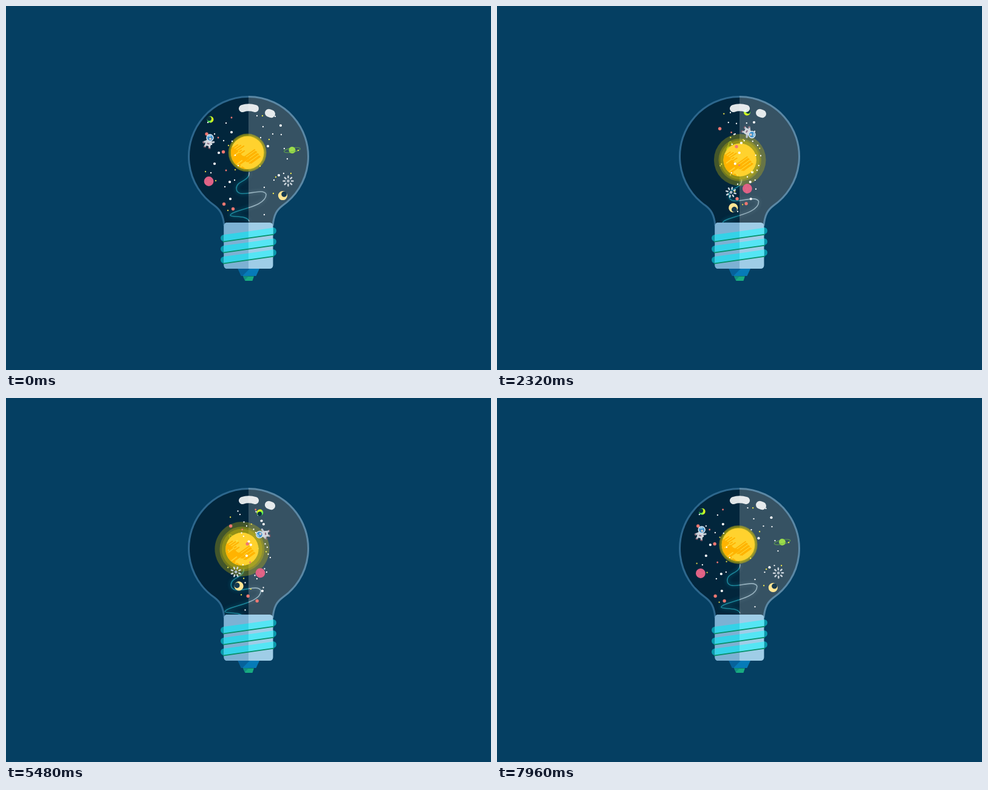
An HTML page for the animation above (8000 ms loop, 800x600 px).

```html
<!DOCTYPE html>
<html lang="en">
<head>
<meta charset="utf-8">
<title>Space in a bulb</title>
<style>
  html, body { margin: 0; width: 100%; height: 100%; overflow: hidden; background: #053f62; }
  svg { display: block; width: 800px; height: 600px; }
</style>
</head>
<body>
<svg viewBox="0 0 800 600">
  <defs>
    <path id="glass" d="M360 362C358 343 353 336 344 329A98.5 98.5 0 1 1 456 329C447 336 442 343 440 362"/>
    <path id="wire" d="M401 274C402 290 380 287 380 301C381 321 423 297 429 310C431 332 371 336 370 345C372 349 398 344 401 355"/>
    <clipPath id="left"><rect x="290" y="130" width="110" height="340"/></clipPath>
    <clipPath id="right"><rect x="400" y="130" width="110" height="340"/></clipPath>
    <clipPath id="inside"><use href="#glass"/></clipPath>
    <clipPath id="disc"><circle r="27.2"/></clipPath>
    <linearGradient id="lime"><stop offset=".3" stop-color="#55ee55"/><stop offset=".8" stop-color="#d8f51c"/></linearGradient>
    <filter id="blur" x="-50%" y="-50%" width="200%" height="200%"><feGaussianBlur stdDeviation="3"/></filter>
  </defs>

  <g clip-path="url(#left)"><use href="#glass" fill="#02263c" stroke="#2d678d" stroke-width="3"/></g>
  <g clip-path="url(#right)"><use href="#glass" fill="#365263" stroke="#5b88a5" stroke-width="3"/></g>

  <g clip-path="url(#inside)" fill="none">
    <g clip-path="url(#left)"><g class="sway">
      <use href="#wire" stroke="#18a0b8" stroke-width="3" opacity=".35" filter="url(#blur)"/>
      <use href="#wire" stroke="#1b8498" stroke-width="1.6"/>
    </g></g>
    <g clip-path="url(#right)"><g class="sway">
      <use href="#wire" stroke="#9fc0cc" stroke-width="3" opacity=".25" filter="url(#blur)"/>
      <use href="#wire" stroke="#97b2bf" stroke-width="1.6"/>
    </g></g>
  </g>

  <g id="saturn">
    <ellipse rx="13.5" ry="3.6" fill="none" stroke="#5c9a50" stroke-width="1.2"/>
    <circle r="5.5" fill="#9bdc4b"/>
    <path d="M-5 1.5Q0 4.5 5 1.5" fill="none" stroke="#77bb46"/>
  </g>

  <g id="sun">
    <g id="glow" fill="#e3cb00" fill-opacity=".29"></g>
    <circle r="27.2" fill="#ffd22e"/>
    <g clip-path="url(#disc)">
      <path d="M-30-12L-18-5L-8 5L4 9L-12 20L2 30H-30Z" fill="#ffb300"/>
      <g id="hatch" stroke="#ffb300" stroke-width="2" stroke-linecap="round"></g>
      <path d="M-17 19l8-6M-11 23l7-5M-22 5l8-6" stroke="#ffd22e" stroke-width="2" stroke-linecap="round"/>
    </g>
  </g>

  <g id="stars"></g>

  <g id="limeMoon"><circle r="5.4" fill="url(#lime)"/><circle cx="-1.8" cy="-1.2" r="3.6" fill="#0a3340"/></g>
  <g id="pinkPlanet">
    <circle r="7.9" fill="#df6186"/>
    <path d="M-5-3h6M-2 0h8M-6 3h7" stroke="#e56f86" stroke-width="1"/>
  </g>
  <g id="burst"></g>
  <g id="creamMoon"><circle r="7.6" fill="#ffe593"/><circle cx="2.3" cy="-2.3" r="4.5" fill="#163a50"/></g>
  <g id="astronaut">
    <path d="M-4 2L-8 5M4 2L8 0M-3 8L-4 11M3 8L4 11" stroke="#bfc5cf" stroke-width="3.2" stroke-linecap="round"/>
    <path d="M-6 12h4M2 12h4M-9 4l2 3" stroke="#805563" stroke-width="1.6"/>
    <rect x="-5" y="-1" width="10" height="10" rx="3" fill="#d3d6dc"/>
    <path d="M-2 5h4" stroke="#8b6c86" stroke-width="2"/>
    <circle cy="-5" r="6.2" fill="#d4e3ef"/>
    <circle cy="-5" r="4.6" fill="#3b8fcb"/>
    <path d="M-3-6A3.4 3.4 0 0 1 1-8" fill="none" stroke="#c7e9fa" stroke-width="1.3"/>
    <circle cx="1" cy="-3.5" r="2" fill="#d7c4bd"/>
  </g>

  <g fill="none" stroke="#fff" stroke-opacity=".88" stroke-linecap="round">
    <path d="M390 169Q400 165.500 411 169" stroke-width="12"/>
    <path d="M433.500 176.200L437.500 177.800" stroke-width="13"/>
  </g>

  <g id="knobs" stroke-width="11" stroke-linecap="round"></g>
  <rect x="359.500" y="357" width="81" height="76" rx="5.500" fill="#9fcde7"/>
  <path d="M400 357V433H365Q359.500 433 359.500 427.500V362.500Q359.500 357 365 357Z" fill="#7db1d3"/>
  <g id="threads"></g>
  <path d="M382.500 433H418L412.500 445H388Z" fill="#067bb8"/>
  <path d="M382.500 433H402L390 445H388Z" fill="#06629b"/>
  <path d="M391 445.500H409L406.500 453H394.500Z" fill="#18ab80"/>
  <path d="M391 445.500H400L394 452Z" fill="#109080"/>
</svg>

<script>
const LOOP = 8000;
const $ = id => document.getElementById(id);

function add(parent, tag, attrs) {
  const node = document.createElementNS('http://www.w3.org/2000/svg', tag);
  for (const key in attrs) node.setAttribute(key, attrs[key]);
  parent.appendChild(node);
  return node;
}

// Out along a bowed path during the first half, back during the second.
// bow: vertical bulge outward, skew: its asymmetry, side: horizontal bulge, back: bulge on the return.
const drifts = [
  { id: 'limeMoon', x: 337, y: 187, dx: 130, dy: 3, bow: -14, turn: 0 },
  { id: 'astronaut', x: 335, y: 222, dx: 140, dy: 4, bow: -15.500, turn: 17 },
  { id: 'pinkPlanet', x: 334.500, y: 289, dx: 135, dy: -1, bow: 13, turn: 0 },
  { id: 'saturn', x: 472, y: 237.500, dx: -152, dy: -1, bow: 0, turn: -10 },
  { id: 'burst', x: 465.500, y: 288.500, dx: -137, dy: -3, bow: 21, turn: 0 },
  { id: 'creamMoon', x: 456.500, y: 312.500, dx: -115, dy: -4, bow: 20.400, skew: -5.400, turn: 0 }
];

const starGroups = [
  { dx: 84, dy: 0, color: '#fff',
    big: [[372, 208], [351, 242], [344, 260], [369, 290], [370, 318]],
    small: [[333, 192], [363, 193], [344, 211], [339, 228], [359, 222], [373, 223], [378, 246],
      [383, 263], [338, 275], [361, 298], [377, 287]] },
  { dx: -50, dy: 0, bow: -5.400, back: 6, color: '#fff',
    big: [[453, 197], [432, 231], [450, 279]],
    small: [[414, 181], [444, 182], [424, 199], [440, 211], [454, 212], [420, 217], [459, 235],
      [464, 252], [458, 276], [442, 287], [426, 299], [456, 307], [426, 344]] },
  { dx: -84, dy: 24.500, bow: -17, skew: 2.300, color: '#f5ec4c',
    big: [], small: [[423, 181], [434, 220], [445, 282], [441, 309], [470, 276], [419, 264], [482, 238]] },
  { dx: 60, dy: -35, bow: 11, side: 4.500, color: '#e6d94a',
    big: [], small: [[329, 273], [346, 288], [366, 337], [367, 230], [378, 270]] },
  { dx: 63, dy: 0, bow: -9, color: '#ee7771',
    big: [[331, 211], [358.500, 240.500], [359.500, 326.500], [374.500, 334.500]],
    small: [[372, 184], [350, 217], [363, 271]] }
];

const pulseTimes = [0, 1520, 3120, 4160, 5480, 6880, 8000];
const pulses = [
  [31.500, 43.200, 42.500, 39.500, 45, 40, 31.500],
  [31, 37, 33.500, 32, 37, 36, 31],
  [29, 34, 30.500, 29.500, 33.500, 32, 29]
];

function offset(m, time) {
  const { bow = 0, skew = 0, side = 0, back = 0 } = m;
  const out = time < LOOP / 2;
  const p = 1 - Math.abs(1 - time / (LOOP / 2));
  const arch = Math.sin(Math.PI * p);
  const bulge = out ? bow * arch + skew * Math.sin(2 * Math.PI * p) : back * arch;
  return [m.dx * p + (out ? side * arch : 0), m.dy * p + bulge];
}

function sample(values, time) {
  let i = 0;
  while (time > pulseTimes[i + 1]) i++;
  const k = (time - pulseTimes[i]) / (pulseTimes[i + 1] - pulseTimes[i]);
  return values[i] + (values[i + 1] - values[i]) * k;
}

const place = (node, x, y, turn = 0) =>
  node.setAttribute('transform', `translate(${x.toFixed(2)} ${y.toFixed(2)}) rotate(${turn.toFixed(2)})`);

for (const group of starGroups) {
  group.node = add($('stars'), 'g', { fill: group.color });
  const dots = (list, r) => list.forEach(([cx, cy]) => add(group.node, 'circle', { cx, cy, r }));
  dots(group.big, group.color === '#fff' ? 2.100 : 2.700);
  dots(group.small, group.color === '#ee7771' ? 1.400 : 1.150);
}

for (let i = 0; i < 8; i++) {
  add($('burst'), 'path', { d: 'M0-5.500V-8', stroke: '#ccd5dc', 'stroke-width': 2.500,
    'stroke-linecap': 'round', transform: `rotate(${i * 45})` });
}
add($('burst'), 'circle', { r: 2.400, fill: '#aebbc5' });

for (let i = 0; i < 7; i++) {
  add($('hatch'), 'path', { d: `M${-9 + i * 2.500} ${10 + i % 2 + i * 1.200}l${21 - i} ${-15 + i * .7}` });
  if (i < 5) add($('hatch'), 'path', { d: `M${-25 + i * 2} ${-7 + i * 3}l${9 + i % 3 * 3} ${-6 - i % 3 * 2}` });
}

for (let i = 0; i < 3; i++) {
  const y = 18 * i;
  add($('knobs'), 'path', { d: `M359.500 ${382.500 + y}h1`, stroke: '#0a9bad' });
  add($('knobs'), 'path', { d: `M439.500 ${370.500 + y}h1`, stroke: '#0a9bad' });
  add($('threads'), 'path', { d: `M359.500 ${377 + y}L400 ${371.500 + y}V${382.500 + y}L359.500 ${388 + y}Z`, fill: '#34d2e7' });
  add($('threads'), 'path', { d: `M400 ${371.500 + y}L440.500 ${365.500 + y}V${376.500 + y}L400 ${382.500 + y}Z`, fill: '#55e5f4' });
  add($('threads'), 'path', { d: `M358 ${388.700 + y}L442 ${376.700 + y}`, stroke: '#079069', 'stroke-width': 1.800 });
}

const rings = pulses.map(() => add($('glow'), 'circle', {}));
const wires = document.querySelectorAll('.sway');

function draw(time) {
  const spin = 360 * time / LOOP;
  for (const body of drifts) {
    const [x, y] = offset(body, time);
    place($(body.id), body.x + x, body.y + y, body.turn + spin);
  }
  for (const group of starGroups) place(group.node, ...offset(group, time));

  const angle = (spin - 67) * Math.PI / 180;
  const sunX = 395.700 + 6.300 * Math.cos(angle);
  const sunY = 249 + 7.800 * Math.sin(angle);
  place($('sun'), sunX, sunY);
  wires.forEach(wire => place(wire, sunX - 398.200, sunY - 241.800));
  rings.forEach((ring, i) => ring.setAttribute('r', sample(pulses[i], time).toFixed(2)));
}

const start = performance.now();
function tick() {
  draw((performance.now() - start) % LOOP);
  requestAnimationFrame(tick);
}
tick();
</script>
</body>
</html>
```
